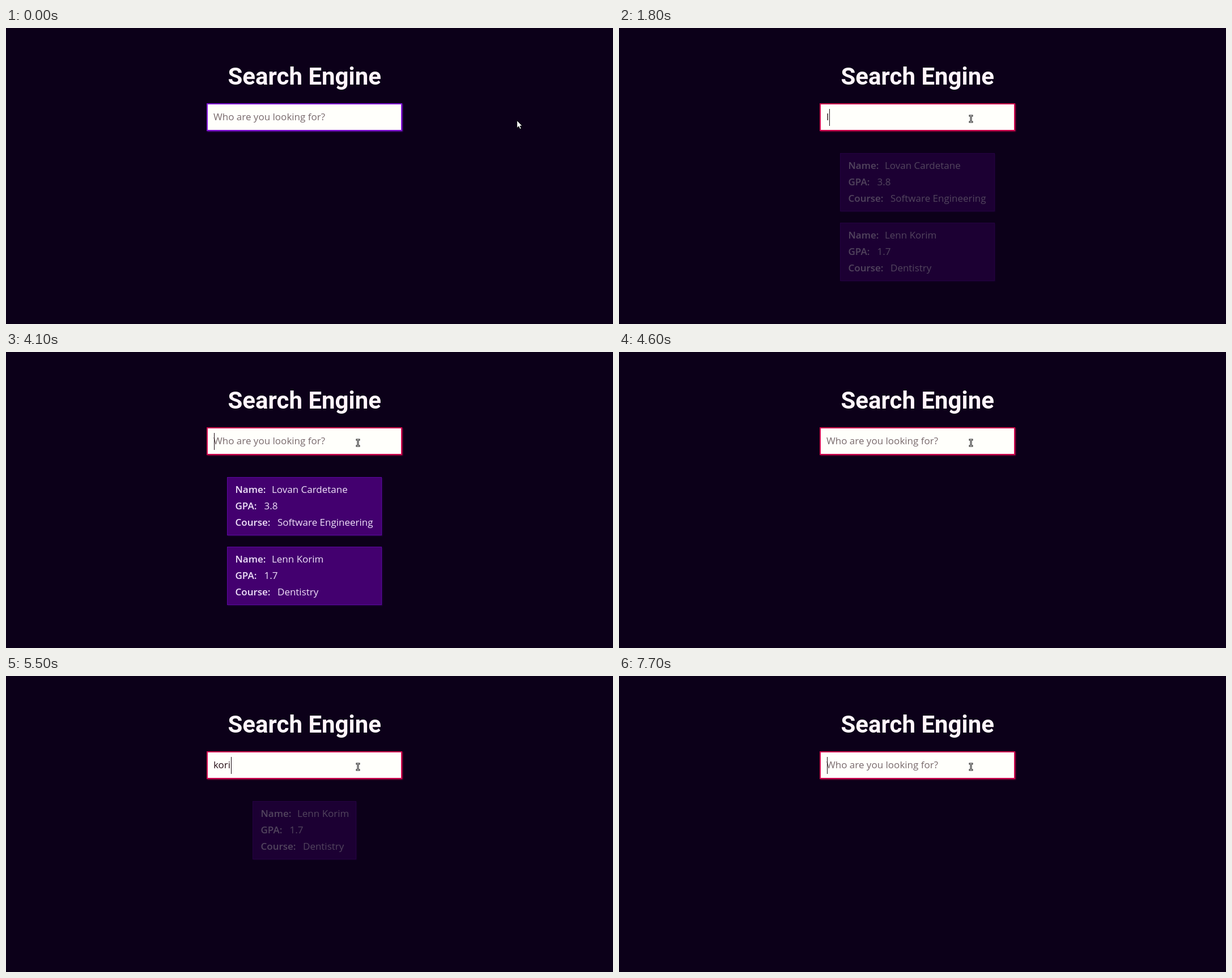
An HTML page that plays this animation: 1071 px wide and 523 px high, repeating every 8 s.

```html
<!DOCTYPE html>
<html lang="en">
<head>
<meta charset="utf-8">
<title>Search Engine</title>
<style>
  html, body { margin: 0; width: 100%; height: 100%; overflow: hidden; background: #0c0019; }
  svg { display: block; width: 100%; height: 100%; }
  text { font: 400 17px "Open Sans", "Noto Sans", sans-serif; white-space: pre; }
  .title { font: 600 42px Roboto, Inter, sans-serif; fill: #fff5fa; text-anchor: middle; }
  .field { fill: #fffffb; stroke: #8212d6; stroke-width: 2; filter: drop-shadow(1px 1px 1px #5a0ca0); }
  .field.focus { stroke: #d0064f; filter: drop-shadow(1px 1px 1px #8c0538); }
  .hint { fill: #78696c; }
  .typed { fill: #281018; }
  .caret { fill: #1c0c14; }
  .card rect { fill: #43006f; stroke: #5b089e; filter: drop-shadow(1px 1px 1px #2a0350); }
  .card text { fill: #f1e2fa; }
  .card .label { font-weight: 600; }
</style>
</head>
<body>
<svg id="stage" viewBox="0 0 1071 523">
  <text class="title" x="526.7" y="100">Search Engine</text>
  <rect id="field" class="field" x="355" y="134" width="343" height="47"/>
  <text id="hint" class="hint" x="366" y="163">Who are you looking for?</text>
  <text id="typed" class="typed" x="366" y="163"></text>
  <rect id="caret" class="caret" y="143" width="1" height="30"/>
  <g id="both"></g>
  <g id="single"></g>
  <path id="arrow" d="M0 0V13.2L3 10.4L5.3 15.2L7.5 14.2L5.3 9.6H9.2Z"
        fill="#fff" stroke="#000" stroke-width=".8"/>
  <g id="beam" fill="none" stroke-linecap="square">
    <path d="M-2 -5.5H2M0 -5.5V5.5M-2 5.5H2" stroke="#222" stroke-width="3"/>
    <path d="M-2 -5.5H2M0 -5.5V5.5M-2 5.5H2" stroke="#ddd" stroke-width="1"/>
  </g>
</svg>
<script>
const LOOP = 8000;
const $ = id => document.getElementById(id);

// Each table row: start time in ms, then the values held from then on.
const typing = [
  [0, "", 0], [600, "", 1], [1200, "", 0],
  [1600, "l", 1], [2200, "l", 0], [2800, "l", 1], [3400, "l", 0],
  [4100, "", 1], [4600, "", 0],
  [4900, "k", 1], [5100, "ko", 1], [5200, "kor", 1], [5300, "kori", 1],
  [5900, "kori", 0], [6500, "kori", 1], [7100, "kori", 0],
  [7300, "", 0], [7700, "", 1]
];
const bothFade = [[0, 0], [1800, .3], [1900, .7], [2000, 1], [4500, 0]];
const singleFade = [[0, 0], [5500, .3], [5600, .7], [5700, 1], [7500, 0]];
const pointer = [[0, 901.6, 163.4], [300, 850, 161], [400, 725, 160], [500, 640, 161], [600, 621, 160.5]];

const people = [
  { name: "Lovan Cardetane", gpa: "3.8", course: "Software Engineering" },
  { name: "Lenn Korim", gpa: "1.7", course: "Dentistry" }
];

function add(parent, tag, attrs, content = "") {
  const node = document.createElementNS(parent.namespaceURI, tag);
  for (const key in attrs) node.setAttribute(key, attrs[key]);
  node.textContent = content;
  return parent.appendChild(node);
}

function addCard(parent, x, y, width, person) {
  const card = add(parent, "g", { class: "card" });
  add(card, "rect", { x: x + .5, y: y + .5, width: width - 1, height: 102 });
  const rows = [["Name:", person.name, 79], ["GPA:", person.gpa, 65.5], ["Course:", person.course, 89]];
  rows.forEach(([label, value, indent], i) => {
    const base = y + 28 + i * 29;
    add(card, "text", { class: "label", x: x + 14.5, y: base }, label);
    add(card, "text", { x: x + indent, y: base }, value);
  });
}

people.forEach((person, i) => addCard($("both"), 390, 221 + i * 123, 273, person));
addCard($("single"), 435, 221, 183, people[1]);

const at = (table, t) => table.findLast(row => row[0] <= t);
const show = (node, on) => node.setAttribute("visibility", on ? "visible" : "hidden");

function render(t) {
  const [, text, caretOn] = at(typing, t);
  $("typed").textContent = text;
  show($("hint"), !text);
  show($("caret"), caretOn);
  const width = text ? $("typed").getComputedTextLength() : 0;
  $("caret").setAttribute("x", Math.round(366.6 + width));
  $("field").classList.toggle("focus", t >= 600);

  $("both").setAttribute("opacity", at(bothFade, t)[1]);
  $("single").setAttribute("opacity", at(singleFade, t)[1]);

  const [, x, y] = at(pointer, t);
  const inField = x < 699;
  show($("arrow"), !inField);
  show($("beam"), inField);
  $(inField ? "beam" : "arrow").setAttribute("transform", `translate(${x} ${y})`);
}

const start = performance.now();
function tick() {
  render((performance.now() - start) % LOOP);
  requestAnimationFrame(tick);
}
tick();
</script>
</body>
</html>
```
